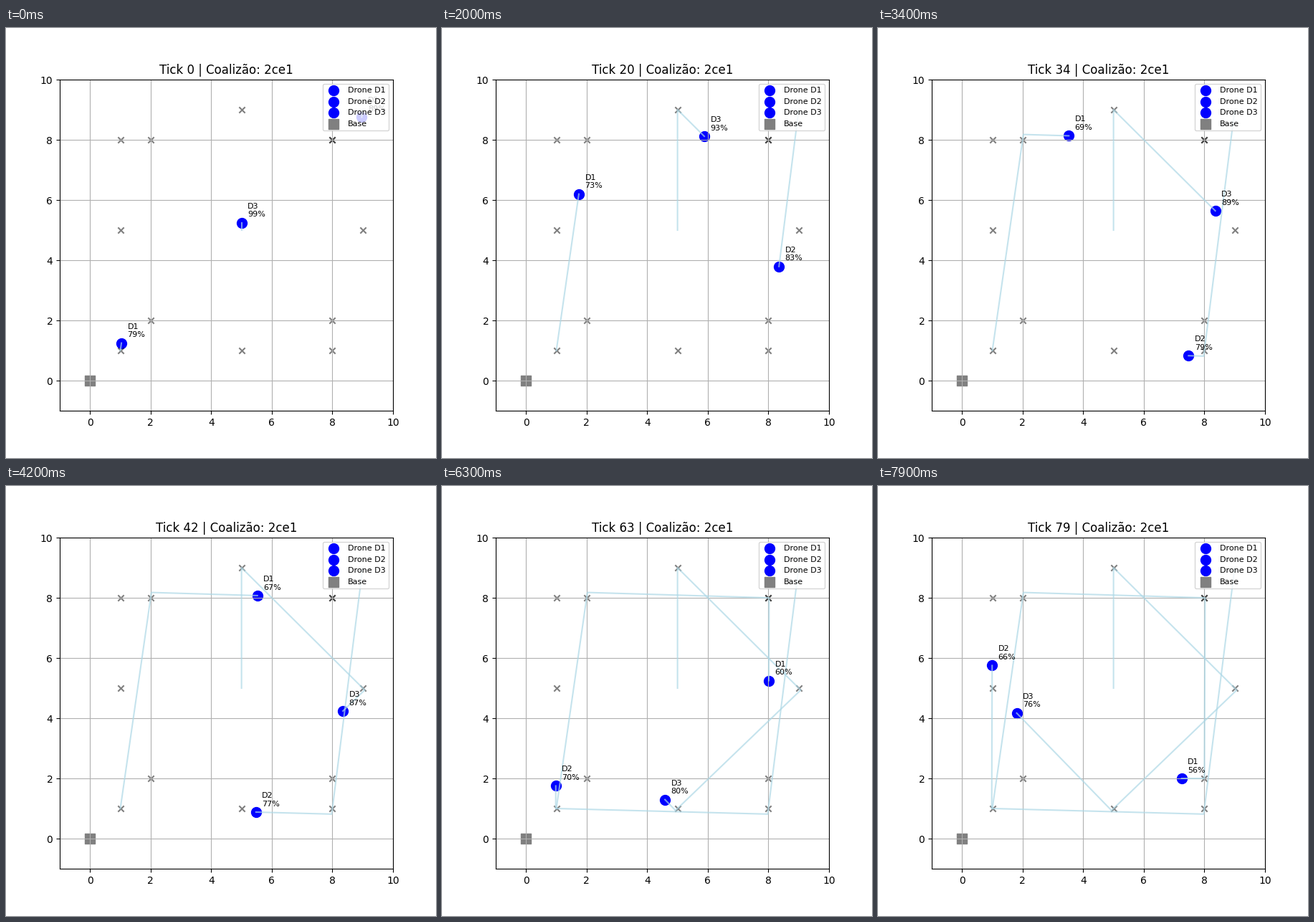
A matplotlib script for the animation above (8000 ms loop, 600 px wide and 600 px high).

```python
import matplotlib.pyplot as plt
import numpy as np
from matplotlib.animation import FuncAnimation

FRAMES = 80
STEP = 0.25

# name, start, battery, patrol loop
DRONES = [
    ("D1", (1, 1), 80, [(2, 8), (8, 8), (8, 2), (2, 2)]),
    ("D2", (9, 9), 90, [(8, 1), (1, 1), (1, 8), (8, 8)]),
    ("D3", (5, 5), 100, [(5, 9), (9, 5), (5, 1), (1, 5)]),
]


def fly(start, route):
    """Positions per tick; a drone within one step still flies on, then turns."""
    pos = np.array(start, float)
    path = [pos]
    goal = 0
    for _ in range(FRAMES):
        gap = np.array(route[goal]) - pos
        dist = np.hypot(*gap)
        if dist <= STEP + 1e-9:
            goal = (goal + 1) % len(route)
        pos = pos + gap / dist * STEP
        path.append(pos)
    return np.array(path)


plt.rcParams["font.family"] = "DejaVu Sans"
fig, ax = plt.subplots(figsize=(6, 6), dpi=100)
ax.set_xlim(-1, 10)
ax.set_ylim(-1, 10)
ax.grid(True)
title = ax.set_title("")

parts = []
for name, start, battery, route in DRONES:
    path = fly(start, route)
    dot = ax.scatter(*start, s=100, color="blue", label=f"Drone {name}")
    tag = ax.text(*start, "", fontsize=8)
    trail, = ax.plot([], [], color="lightblue", alpha=0.7)
    for point in route:
        ax.scatter(*point, marker="x", color="black", alpha=0.5)
    parts.append((name, battery, path, dot, tag, trail))

ax.scatter(0, 0, s=100, marker="s", color="gray", label="Base")
ax.legend(loc="upper right", fontsize=8)


def update(tick):
    moves = tick + 1
    title.set_text(f"Tick {tick} | Coalizão: 2ce1")
    for name, battery, path, dot, tag, trail in parts:
        pos = path[moves]
        charge = (10 * battery - 3 * moves) // 10
        dot.set_offsets([pos])
        tag.set_position(pos + 0.2)
        tag.set_text(f"{name}\n{charge}%")
        trail.set_data(*path[:moves + 1].T)
    return []


anim = FuncAnimation(fig, update, frames=FRAMES, interval=100,
                     init_func=lambda: update(0), repeat=True, repeat_delay=0)
plt.show()
```
